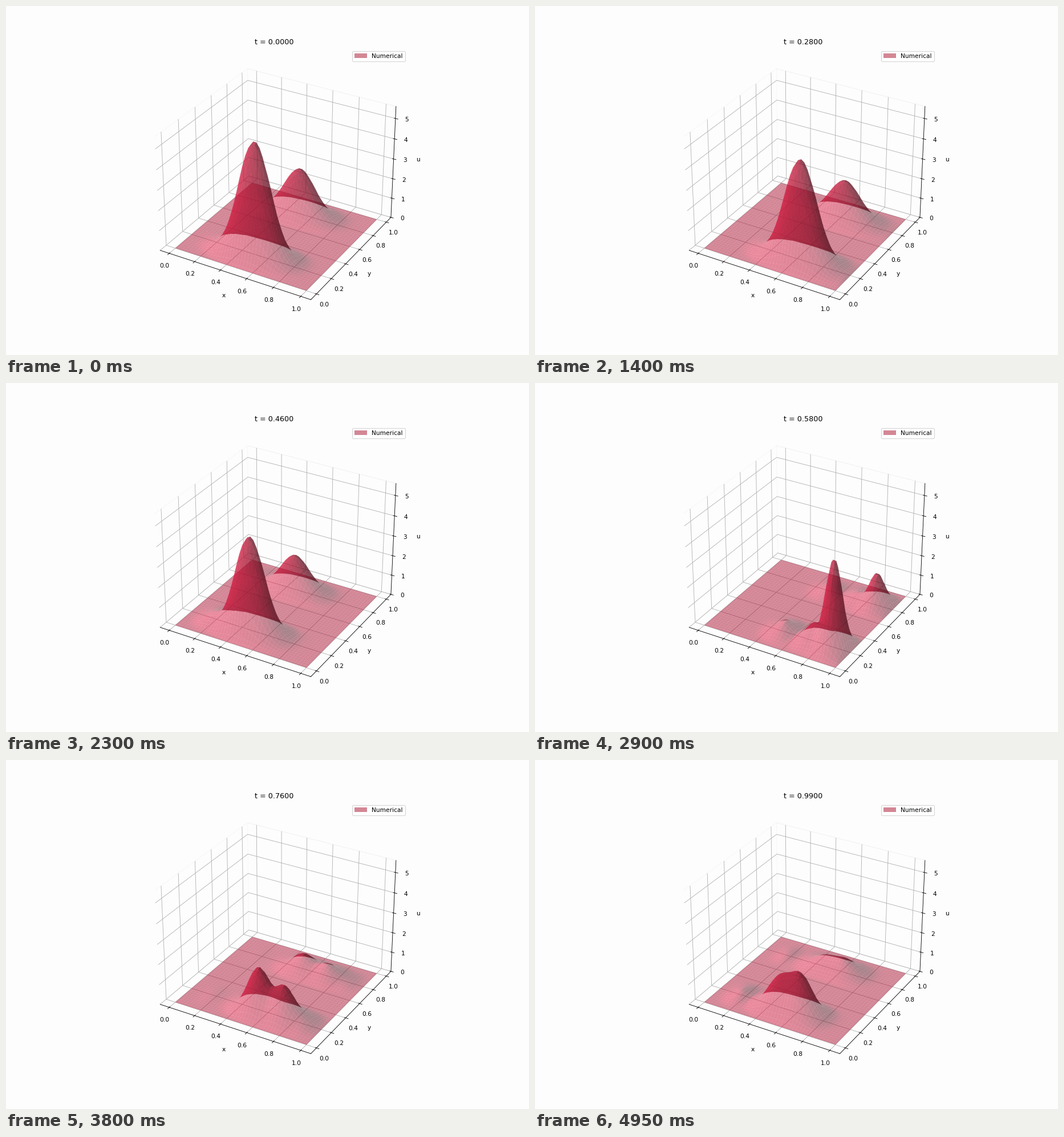
Recreate the animation shown at these times as a matplotlib script. Size 917x611 px, loop 5 s.

```python
import numpy as np
import matplotlib.pyplot as plt
from matplotlib.animation import FuncAnimation
from matplotlib.colors import to_rgb
from matplotlib.patches import Patch
from mpl_toolkits.mplot3d.art3d import Poly3DCollection

WIDTH, HEIGHT, DPI = 917, 611, 76.4
FRAMES, INTERVAL = 100, 50
POINTS = 44
BACKGROUND = "#fdfdfd"
CRIMSON = np.array(to_rgb("crimson"))
ALPHA = 0.5
LIGHT = np.array([-2, -2, 1]) / 3
PEAK = 5.55
BOUNCE, WALL = 0.46, 0.58  # times: back at the middle, at the right wall


def ease(t, start, end):
    p = np.clip((t - start) / (end - start), 0, 1)
    return p * p * (3 - 2 * p)


def gauss(s, centre, width):
    return np.exp(-0.5 * ((s - centre) / width) ** 2)


def main_packet(s, t):
    """Swings right and back, then runs to the wall and fades there."""
    swing = 0.16 * np.sin(np.pi * min(t, BOUNCE) / BOUNCE) ** 4
    dash = ease(t, BOUNCE, WALL)
    centre = 0.5 + swing + 0.372 * dash - 0.035 * ease(t, 0.34, BOUNCE) * (1 - dash)
    height = PEAK * np.exp(-0.42 * t) * np.exp(-87 * max(t - WALL, 0) ** 2)
    return height * gauss(s, centre, 0.115 - 0.065 * ease(t, 0.42, WALL))


def inner_echo(s, t):
    """Beats in height between the wall and the middle."""
    beat = 1.75 + 0.95 * np.cos(2 * np.pi * (t - 0.68) / 0.31)
    height = beat * np.exp(-1.2 * (t - 0.68)) * ease(t, BOUNCE, 0.68)
    centre = 0.72 - 0.09 * ease(t, 0.84, 0.99)
    return height * gauss(s, centre, 0.05 + 0.028 * ease(t, 0.6, 0.9))


def middle_echo(s, t):
    """Grows and sways around the middle."""
    height = 2.45 * gauss(t, 0.84, 0.148)
    centre = 0.49 + 0.09 * np.cos(2 * np.pi * (t - 0.68) / 0.44)
    return height * gauss(s, centre, 0.055 + 0.025 * ease(t, 0.6, 0.84))


def left_ripple(s, t):
    height = 0.24 * (gauss(t, BOUNCE, 0.04) + ease(t, 0.74, 0.84))
    return height * gauss(s, 0.17, 0.045)


def profile_x(s, t):
    parts = (main_packet, inner_echo, middle_echo, left_ripple)
    total = sum(part(s, t) for part in parts)
    total[[0, -1]] = 0
    return total


def lobe(s, centre):
    """Smooth hump that is exactly zero 0.2 away from its centre."""
    reach = np.clip((s - centre) / 0.2, -1, 1)
    return np.cos(np.pi / 2 * reach) ** 3


def profile_y(s, t):
    return lobe(s, 0.2) + (0.42 - 0.08 * t) * lobe(s, 0.8)


def quads(z):
    grid = np.stack([X, Y, z], axis=-1)
    corners = [grid[:-1, :-1], grid[:-1, 1:], grid[1:, 1:], grid[1:, :-1]]
    return np.stack(corners, axis=2).reshape(-1, 4, 3)


def shade(normals):
    level = 0.3 + 0.35 * (normals @ LIGHT + 1)
    rgba = np.full((len(normals), 4), ALPHA)
    rgba[:, :3] = level[:, None] * CRIMSON
    return rgba


def surface(t):
    faces = quads(np.outer(profile_y(axis, t), profile_x(axis, t)))
    normals = np.cross(faces[:, 2] - faces[:, 0], faces[:, 3] - faces[:, 1])
    normals /= np.linalg.norm(normals, axis=1, keepdims=True)
    return faces, shade(normals)


axis = np.linspace(0, 1, POINTS)
X, Y = np.meshgrid(axis, axis)

fig = plt.figure(figsize=((WIDTH + 1e-4) / DPI, (HEIGHT + 1e-4) / DPI),
                 dpi=DPI, facecolor=BACKGROUND)
ax = fig.add_subplot(projection="3d", facecolor=BACKGROUND)

margin = 0.05 + 1.1 / 48
ax.set_xlim(-margin, 1 + margin)
ax.set_ylim(-margin, 1 + margin)
ax.set_zlim(0, 5.585)
ax.set_xlabel("x")
ax.set_ylabel("y")
ax.set_zlabel("u")
for side in (ax.xaxis, ax.yaxis, ax.zaxis):
    side.pane.fill = False
title = ax.set_title("t = 0.0000")

start_faces, start_colors = surface(0)
sheet = Poly3DCollection(start_faces, facecolors=start_colors, linewidths=0)
ax.add_collection3d(sheet)

flat = shade(np.array([[0, 0, 1]]))[0]
ax.legend(handles=[Patch(facecolor=flat, edgecolor="none", label="Numerical")],
          loc="upper right")


def update(frame):
    t = frame / FRAMES
    faces, colors = surface(t)
    sheet.set_verts(faces)
    sheet.set_facecolor(colors)
    title.set_text(f"t = {t:.4f}")
    return sheet, title


anim = FuncAnimation(fig, update, frames=FRAMES, interval=INTERVAL,
                     repeat=True, repeat_delay=0, blit=False)
plt.show()
```
